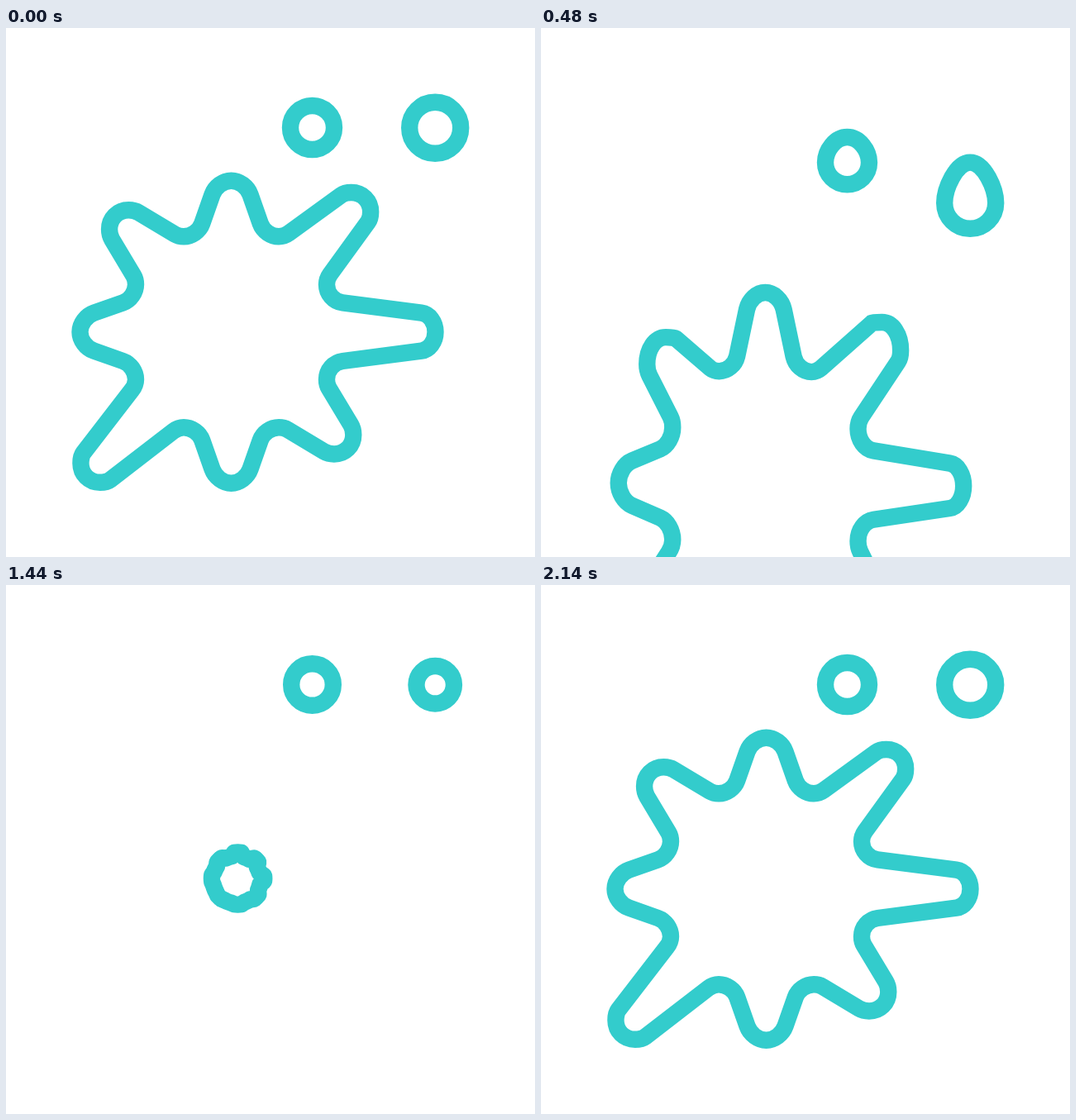
Recreate the animation shown at these times as an HTML page with a canvas. Size 640 by 640 pixels, loop 2.42 s.

```html
<!DOCTYPE html>
<html lang="en">
<head>
<meta charset="utf-8">
<title>Splat and drops</title>
<style>
html, body { margin: 0; width: 100%; height: 100%; overflow: hidden; background: #fff; }
canvas { display: block; }
</style>
</head>
<body>
<canvas id="stage" width="640" height="640"></canvas>
<script>
const ctx = document.getElementById('stage').getContext('2d');
const LOOP = 2420, GONE = 1140, GROW_START = 1440, GROW_END = 2140;
const CX = 272.5, CY = 367.7;
const reach = [166, 211, 230, 181.5, 166, 230, 166, 181]; // arm lengths, clockwise from the top
const lerp = (a, b, k) => a + (b - a) * k;
const mix = (p, q, k) => [lerp(p[0], q[0], k), lerp(p[1], q[1], k)];
const side = i => [Math.cos(i * Math.PI / 4), Math.sin(i * Math.PI / 4)];
const root = i => 131 + 0.06 * (reach[i % 8] - 166);

// A point in the frame of arm i: distance outwards and clockwise offset.
function spot(i, along, across) {
  const [c, s] = side(i);
  return [CX + along * s + across * c, CY - along * c + across * s];
}

// Each arm gives a rounded tip and the rounded valley after it.
const corners = reach.flatMap((r, i) => {
  const diagonal = i % 2 === 1;
  const tipMids = diagonal ? [spot(i, r + 11, -16.5), spot(i, r + 11, 16.5)] : [spot(i, r + 17, 0)];
  const valleyMid = diagonal ? spot(i + 1, 115.5, -57.5) : spot(i, 115.5, 57.5);
  return [
    {
      up: side(i)[0] > 0.5,
      dirs: diagonal ? [side(i - 1), side(i + 1)] : [side(i)],
      pts: [spot(i, r, -23), ...tipMids, spot(i, r, 23)]
    },
    {
      valley: true,
      dirs: [side(diagonal ? i + 1 : i)],
      pts: [spot(i, root(i), 35.3), valleyMid, spot(i + 1, root(i + 1), -35.3)]
    }
  ];
});

// Lower parts fall faster; the middle of the upward tips lags behind.
function fallen([x, y], { up }) {
  const dx = x - CX, dy = y - CY;
  const drag = up ? 0.0016 * dx * dx - 30 : 0;
  return [x - 0.055 * (x - 235), y + 347 + 0.34 * dy + 0.015 * dx + drag];
}

function blob([x, y], { valley }) {
  const angle = Math.atan2(y - CY, x - CX);
  const r = valley ? 28.5 - 2 * Math.cos(angle + Math.PI / 4) : 31;
  return [280.5 + r * Math.cos(angle), 355 + r * Math.sin(angle)];
}

function meet(p, u, q, v) {
  const s = ((q[0] - p[0]) * v[1] - (q[1] - p[1]) * v[0]) / (u[0] * v[1] - u[1] * v[0]);
  return [p[0] + u[0] * s, p[1] + u[1] * s];
}

// Expands each corner into a start point followed by cubic Bézier triples.
function outline(place) {
  const shape = corners.map(corner => corner.pts.map(p => place(p, corner)));
  const sub = (p, q) => [p[0] - q[0], p[1] - q[1]];
  return shape.map((pts, i) => {
    const before = shape.at(i - 1).at(-1), after = shape[(i + 1) % shape.length][0];
    const dirs = [sub(pts[0], before), ...corners[i].dirs, sub(after, pts.at(-1))];
    const path = [pts[0]];
    for (let k = 1; k < pts.length; k++) {
      const p = pts[k - 1], q = pts[k];
      const m = meet(p, dirs[k - 1], q, dirs[k]);
      path.push(mix(p, m, 0.57), mix(q, m, 0.57), q);
    }
    return path;
  });
}

const rest = outline(p => p);
const down = outline(fallen);
const seed = rest.map((path, i) => path.map(p => blob(p, corners[i])));

function drawSplat(from, to, k) {
  ctx.beginPath();
  from.forEach((path, i) => {
    const pts = path.map((p, j) => mix(p, to[i][j], k));
    ctx.lineTo(...pts[0]);
    for (let j = 1; j < pts.length; j += 3) {
      ctx.bezierCurveTo(...pts[j], ...pts[j + 1], ...pts[j + 2]);
    }
  });
  ctx.closePath();
  ctx.stroke();
}

// A circle whose top lags behind its lower half by `lag`.
function drawDrop(x, y, r, lag = 0) {
  const h = r * 0.5523, top = y - r - lag;
  ctx.beginPath();
  ctx.moveTo(x - r, y);
  ctx.bezierCurveTo(x - r, y - h, x - h, top, x, top);
  ctx.bezierCurveTo(x + h, top, x + r, y - h, x + r, y);
  ctx.arc(x, y, r, 0, Math.PI);
  ctx.closePath();
  ctx.stroke();
}

// Constant acceleration, then constant speed after `limit` ms.
function drop(t, accel, limit = Infinity) {
  const s = Math.max(0, t), a = Math.min(s, limit);
  return accel * a * (2 * s - a);
}

function draw(t) {
  ctx.clearRect(0, 0, 640, 640);
  ctx.strokeStyle = '#33cccc';
  ctx.lineWidth = 20.4;
  ctx.lineJoin = 'round';
  if (t < GONE) {
    const small = drop(t - 255, 7.45e-4), big = drop(t - 156, 6.89e-4, 699);
    drawSplat(rest, down, (t / 660) ** 2);
    drawDrop(370.5, 120.5 + small * 1.11, 26.5, small * 0.11);
    drawDrop(519.2, 120.8 + big * 1.25, 31, big * 0.25);
  } else if (t >= GROW_START) {
    const left = Math.max(0, (GROW_END - t) / (GROW_END - GROW_START));
    const k = 1 - left ** 2.52;
    drawSplat(seed, rest, k);
    drawDrop(370.5, 120.5, lerp(25.3, 26.5, k));
    drawDrop(519.2, 120.8, lerp(22.7, 31, k));
  }
}

const start = performance.now();
function tick() {
  draw((performance.now() - start) % LOOP);
  requestAnimationFrame(tick);
}
tick();
</script>
</body>
</html>
```
